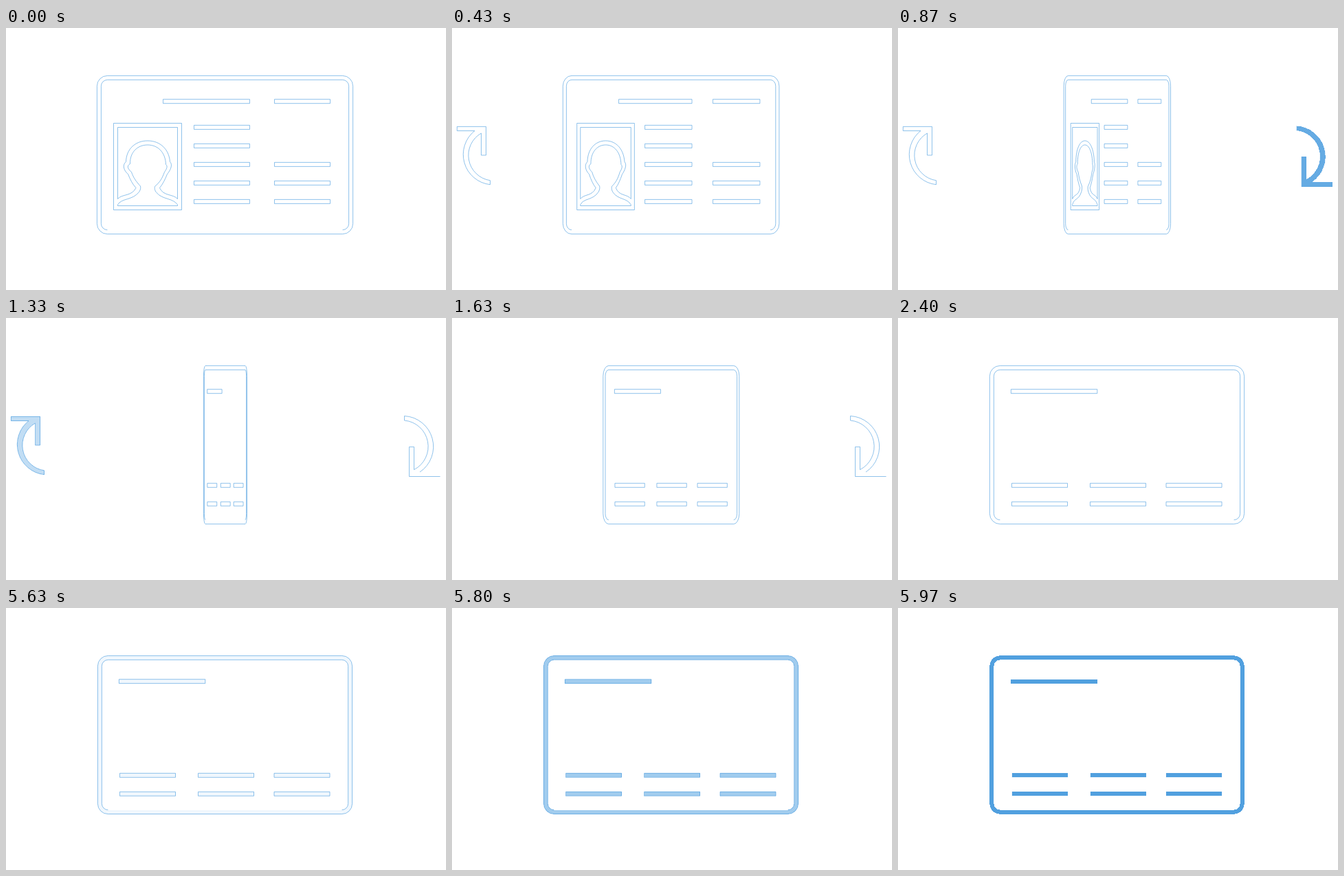
An HTML page for the animation above (6010 ms loop, 640 px wide and 381 px high).

```html
<!DOCTYPE html>
<html lang="en">
<head>
<meta charset="utf-8">
<title>Card flip</title>
<style>
html, body { margin: 0; width: 100%; height: 100%; overflow: hidden; background: #fff; }
svg { display: block; width: 100%; height: 100%; }
.fill { stroke: none; fill-rule: evenodd; shape-rendering: crispEdges; }
.line { fill: none; stroke-width: .6; vector-effect: non-scaling-stroke; }
</style>
</head>
<body>
<svg viewBox="0 0 640 381" fill="#49d" stroke="#49d">
  <g id="front"></g>
  <g id="back"></g>
  <g id="left"></g>
  <g id="right"></g>
</svg>
<script>
const LOOP = 6010, TURN = 2400, FADE = 400, LIFE = 1600, CENTER = 319.1;
const [front, back, left, right] =
  ['front', 'back', 'left', 'right'].map(id => document.getElementById(id));

const box = (x, y, w, h) => `M${x} ${y}h${w}v${h}h${-w}Z`;
const bars = (xs, ys, w) =>
  ys.map(y => xs.map(x => box(x, y, w, 6)).join('')).join('');

// Rounded box whose bottom side is only stroked when closed
function rounded(x0, y0, x1, y1, r) {
  const arc = (x, y) => `A${r} ${r} 0 0 1 ${x} ${y}`;
  return `M${x0 + r} ${y1}` + arc(x0, y1 - r) + `V${y0 + r}` + arc(x0 + r, y0) +
    `H${x1 - r}` + arc(x1, y0 + r) + `V${y1 - r}` + arc(x1 - r, y1);
}

const frame = (x0, x1) =>
  rounded(x0, 69.4, x1, 299.6, 15) + 'Z' + rounded(x0 + 6, 75.4, x1 - 6, 293.6, 9);

const portrait = box(156.5, 138.5, 99, 126) +
  // backdrop around the head and shoulders
  `M162.5 248.5V144.5H249.5V248.5C243 241 229 245 223.5 232.5
   C228 227 231 221 234.5 212.5C239 207 243 199 238.5 194.5
   C237 176 224 164 206 164C188 164 175 176 174.5 194.5
   C169 199 171 207 177.5 212.5C181 221 184 227 189 232.5
   C183 245 169 241 162.5 248.5Z` +
  // inside of the figure
  `M162.5 258.5V257C168 247 184 251 193.5 238.5
   C196 235 196 232 195.5 230C189 223 185 217 182.5 209.5
   C176 204 176 200 180.5 197.5C180 181 191 170 206 170
   C221 170 232 181 232.5 198.5C236 201 233 206 230.5 209.5
   C227 219 224 224 216.5 230.5C216 233 216 236 219 239.5
   C228 250 243 247 249.5 257V258.5Z`;

const frontBars = bars([228.5], [103.7], 126) + bars([390.5], [103.7], 81) +
  bars([273.5], [141.4, 168.4], 81) + bars([273.5, 390.5], [195.4, 222.4, 249.4], 81);

const backBars = bars([164.4], [103.7], 125.4) +
  bars([165.5, 279.5, 390], [240.3, 267.3], 81);

const leftArrow = `M7.4 143.4H49.5V185H42.5V153A37 37 0 0 0 55.5 221.7
  V227.7A44 44 0 0 1 33 149.5H7.4Z`;
const rightArrow = `M631.5 230.5H586.5V187.4H593.5V220.6A38 38 0 0 0 579.5 149
  V142.5A44.6 44.6 0 0 1 602 224`;

const shape = (fill, line = fill) =>
  `<path class="fill" d="${fill}"/><path class="line" d="${line}"/>`;
front.innerHTML = shape(frame(132.4, 504.6) + portrait + frontBars);
back.innerHTML = shape(frame(133.4, 503.6) + backBars);
left.innerHTML = shape(leftArrow);
right.innerHTML = shape(rightArrow + 'H631.5Z', rightArrow);

function show(el, visible, fill) {
  el.style.display = visible ? '' : 'none';
  el.setAttribute('fill-opacity', fill);
  el.setAttribute('stroke-opacity', Math.min(1, 2 * (1 - fill)));
}

// Arrows begin solid, thin out to an outline and fill again before leaving
function arrow(el, age) {
  const fill = Math.max(0, 1 - age / FADE, (age - LIFE) / FADE + 1);
  show(el, age > 15 && age < LIFE, Math.min(1, fill));
}

function draw(t) {
  const width = Math.abs(Math.cos(Math.PI * Math.min(t / TURN, 1)));
  const turn = `translate(${CENTER * (1 - width)}) scale(${Math.max(width, .001)} 1)`;
  front.setAttribute('transform', turn);
  back.setAttribute('transform', turn);
  show(front, t < TURN / 2, 0);
  show(back, t >= TURN / 2, Math.min(1, Math.max(0, (t - 5600) / FADE)));
  arrow(left, t);
  arrow(right, t - 800);
}

const start = performance.now();
function tick() {
  draw((performance.now() - start) % LOOP);
  requestAnimationFrame(tick);
}
tick();
</script>
</body>
</html>
```
